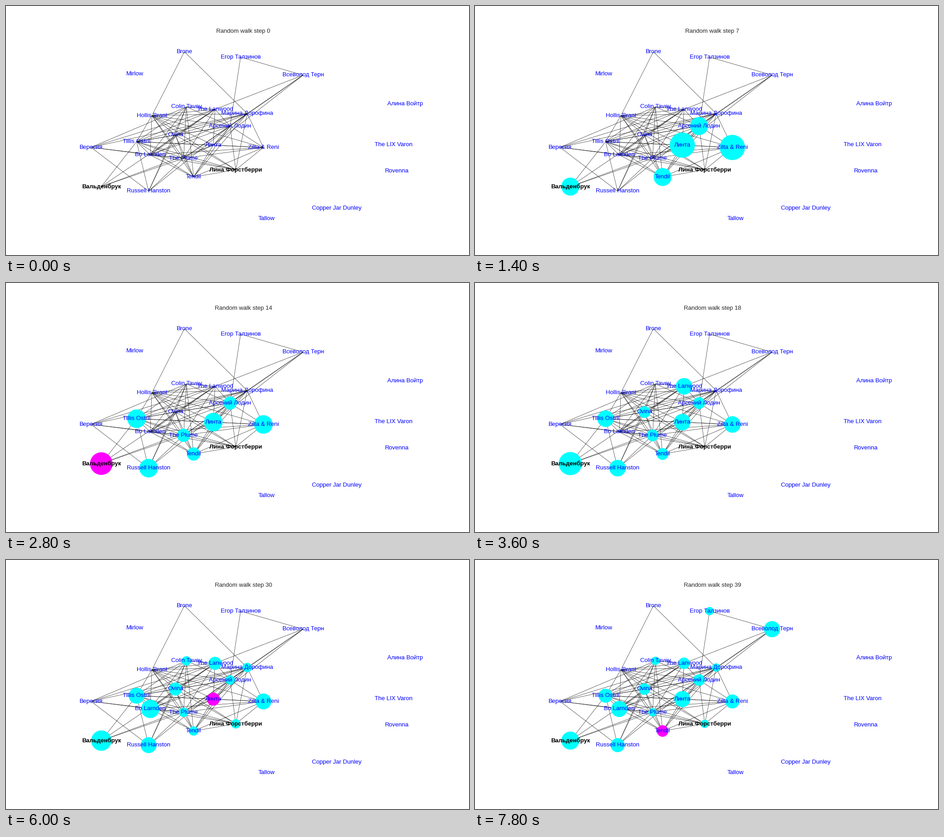
Write a matplotlib script that moves like this. It is 1020 by 549 pixels and loops after 8 s.

```python
import numpy as np
import matplotlib.pyplot as plt
from matplotlib.animation import FuncAnimation
from matplotlib.collections import LineCollection

WIDTH, HEIGHT, DPI = 1020, 549, 64
PT = 72 / DPI           # points per pixel
UNIT = 1020 / 13 / 72   # drawing scale: pixels per nominal point

plt.rcParams["font.family"] = "Liberation Sans"

# key: (label, x, y) in stage pixels
NODES = {
    "B": ("Brone", 393, 100.8),
    "G": ("Егор Талзинов", 516.8, 112.7),
    "T": ("Всеволод Терн", 654.4, 152.5),
    "H": ("Mirlow", 284, 150.2),
    "A": ("Алина Войтра", 882.5, 216),
    "C": ("Colin Tavey", 397.5, 222.4),
    "W": ("The Lanwood", 460.5, 227.8),
    "D": ("Марина Дорофина", 531.3, 237),
    "S": ("Hollis Brant", 321.5, 241.7),
    "L": ("Арсений Лодин", 493.7, 264.7),
    "O": ("Ovina", 373.3, 284.5),
    "I": ("Tillis Ostril", 287.7, 299.2),
    "N": ("Линта", 456.7, 306.7),
    "Z": ("Zilta & Reni", 567, 311.9),
    "V": ("Вересия", 187.3, 311.6),
    "E": ("Bo Larnden", 317.7, 328.4),
    "P": ("The Plume", 391.2, 335.8),
    "X": ("The LIX Varon", 854, 306.5),
    "F": ("Лина Форстберри", 506.2, 361.2),
    "R": ("Rovenna", 861, 364.5),
    "K": ("Tendil", 413.3, 377),
    "M": ("Вальденбрук", 210, 398.2),
    "U": ("Russell Hanston", 314.2, 408.25),
    "J": ("Copper Jar Dunley", 728.7, 446),
    "Y": ("Tallow", 573.5, 469.5),
}
BOLD = "FM"

LINKS = {
    "B": "SD", "G": "TL", "T": "WLDN",
    "V": "CWDPEU", "U": "ICOPL", "M": "IWPN",
    "S": "WDLZNPKIEOF", "C": "WIEOPLK", "W": "IEOPLN",
    "D": "IEOPKFZNL", "L": "IEOPKFZN", "O": "PKEIF",
    "I": "ZNPKFE", "E": "ZPKF", "P": "ZNFK",
    "K": "NZF", "Z": "FN",
}

WALK = "MNZKNZLUMPIUMIMWOWEMECUOEZEIDFNTGTKTLTNK"

keys = list(NODES)
pos = {k: NODES[k][1:] for k in keys}

fig = plt.figure(figsize=(WIDTH / DPI, HEIGHT / DPI), dpi=DPI, facecolor="white")
ax = fig.add_axes([0.125, 0.11, 0.775, 0.77])
ax.set_xlim(0.125 * WIDTH, 0.9 * WIDTH)
ax.set_ylim(0.89 * HEIGHT, 0.12 * HEIGHT)
ax.axis("off")

font_size = 12 * UNIT * PT
title = ax.set_title("", fontsize=font_size, color="#262626", pad=6 * UNIT * PT)

segments = [(pos[a], pos[b]) for a, ends in LINKS.items() for b in ends]
ax.add_collection(LineCollection(segments, colors="black",
                                 linewidths=0.55 * UNIT * PT, zorder=1))

dots = ax.scatter(*zip(*pos.values()), s=0, zorder=2)

for key, (label, x, y) in NODES.items():
    bold = key in BOLD
    ax.text(x, y, label, ha="center", va="center", fontsize=font_size,
            color="black" if bold else "blue",
            weight="bold" if bold else "normal", clip_on=True, zorder=3)


def draw(step):
    """Size nodes by their share of past visits and mark the current one."""
    visits = np.array([WALK[:step].count(k) for k in keys])
    diameter = 100 * UNIT * PT * np.sqrt(visits / (step + 1))
    colors = ["magenta" if k == WALK[step] else "cyan" for k in keys]
    dots.set_sizes(diameter ** 2)
    dots.set_linewidths(np.where(visits > 0, UNIT * PT, 0))
    dots.set_facecolor(colors)
    dots.set_edgecolor(colors)
    title.set_text(f"Random walk step {step}")
    return dots, title


anim = FuncAnimation(fig, draw, frames=len(WALK), interval=200,
                     repeat=True, repeat_delay=0)
plt.show()
```
